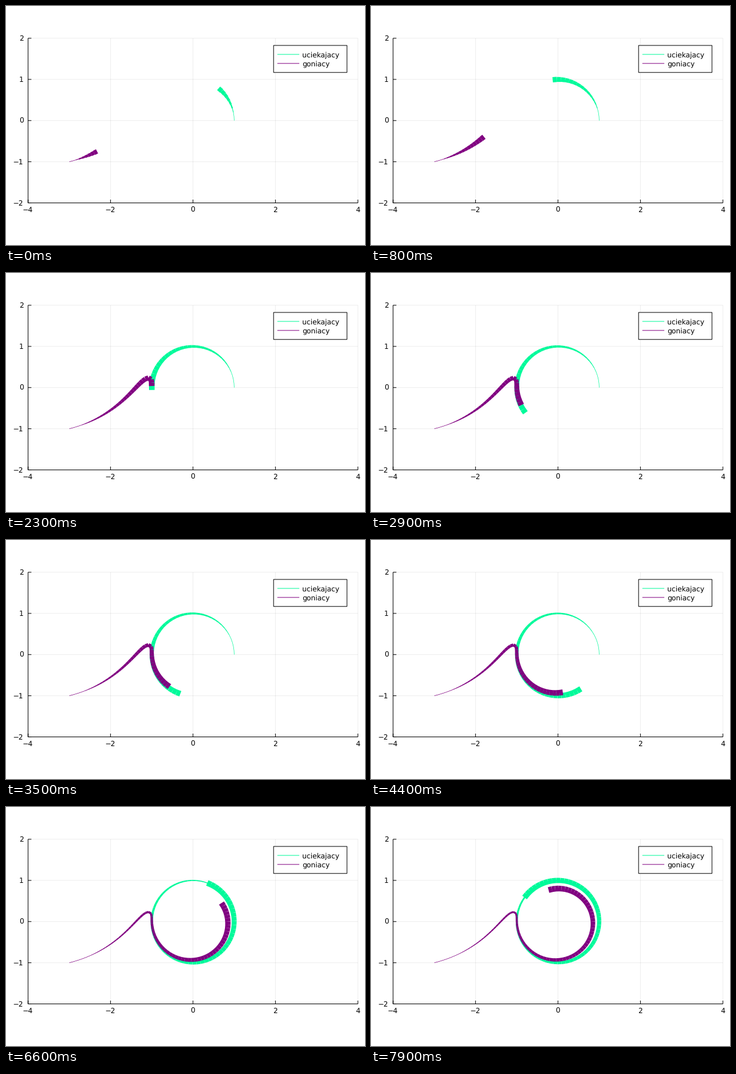
A matplotlib script that plays this animation: 600 px wide and 400 px high, repeating every 8000 ms.

```python
import matplotlib.pyplot as plt
import numpy as np
from matplotlib.animation import FuncAnimation
from matplotlib.collections import LineCollection
from matplotlib.patches import Rectangle

DPI = 100
PX = 72 / DPI            # points per pixel
UNIT = 68.9              # pixels per data unit
CX, CY = 312.5, 191.75   # pixel position of the data origin
FRAMES, FIRST = 80, 10   # frame count, points visible at the start
DT, SPEED, SUB = 0.1, 0.8, 50
MIN_WIDTH, MAX_WIDTH = 0.7, 10
FONT = dict(family="DejaVu Sans", size=8.45, color="black", va="baseline")
RUNNER, CHASER = "#00fa9a", "#800080"

plt.rcParams["text.hinting"] = "none"


def runner(t):
    return np.array([np.cos(t), np.sin(t)])


def to_px(points):
    return np.asarray(points) * [UNIT, -UNIT] + [CX, CY]


def chase(count):
    """Pure pursuit of the runner, sampled every DT."""
    def velocity(t, p):
        d = runner(t) - p
        return SPEED * d / np.hypot(*d)

    p, h = np.array([-3.0, -1.0]), DT / SUB
    path = [p]
    for i in range((count - 1) * SUB):
        t = i * h
        p = p + h * velocity(t + h / 2, p + h / 2 * velocity(t, p))
        if (i + 1) % SUB == 0:
            path.append(p)
    return np.array(path)


fig = plt.figure(figsize=(600 / DPI, 400 / DPI), dpi=DPI, facecolor="white")
ax = fig.add_axes([0, 0, 1, 1])
ax.set(xlim=(0, 600), ylim=(400, 0))
ax.axis("off")


def line(x0, y0, x1, y1, color="black", z=1, **kw):
    ax.plot([x0, x1], [y0, y1], color=color, lw=PX, zorder=z, snap=False,
            solid_capstyle="butt", **kw)


left, top = to_px((-4, 2))
right, bottom = to_px((4, -2))


def label(value):
    return str(value).replace("-", "\u2212")


for v in range(-4, 5, 2):
    x = CX + v * UNIT
    line(x, top, x, bottom, alpha=0.07, z=0)
    line(x, bottom, x, bottom - 5.5)
    ax.text(x - 0.4, 345.2, label(v), ha="center", **FONT)
for v in range(-2, 3):
    y = CY - v * UNIT
    line(left, y, right, y, alpha=0.07, z=0)
    line(left, y, left + 5.5, y)
    ax.text(29.3, y + 4.2, label(v), ha="right", **FONT)
line(left, top, left, bottom)
line(left, bottom, right, bottom)

ax.add_patch(Rectangle((447.2, 66), 122.7, 45.2, fc="white", ec="black",
                       lw=PX, zorder=5, snap=False))
for y, color, name in ((81, RUNNER, "uciekajacy"), (96.1, CHASER, "goniacy")):
    line(453.5, y, 490.2, y, color, z=6)
    ax.text(495.5, y + 4.2, name, zorder=6, **FONT)

total = FRAMES + FIRST - 1
tracks = []
for path, color, z in ((runner(np.arange(total) * DT).T, RUNNER, 2),
                       (chase(total), CHASER, 3)):
    pts = to_px(path)
    trail = LineCollection([], colors=color, capstyle="butt", zorder=z)
    trail.set_snap(False)
    ax.add_collection(trail, autolim=False)
    tracks.append((trail, np.stack([pts[:-1], pts[1:]], axis=1)))


def update(frame):
    n = frame + FIRST
    widths = MAX_WIDTH * (np.arange(n - 1) - 1) / (n - 1)
    for trail, segments in tracks:
        trail.set_segments(segments[:n - 1])
        trail.set_linewidths(np.maximum(widths, MIN_WIDTH) * PX)
    return [trail for trail, _ in tracks]


anim = FuncAnimation(fig, update, frames=FRAMES, interval=100, repeat=True,
                     repeat_delay=0)
plt.show()
```
